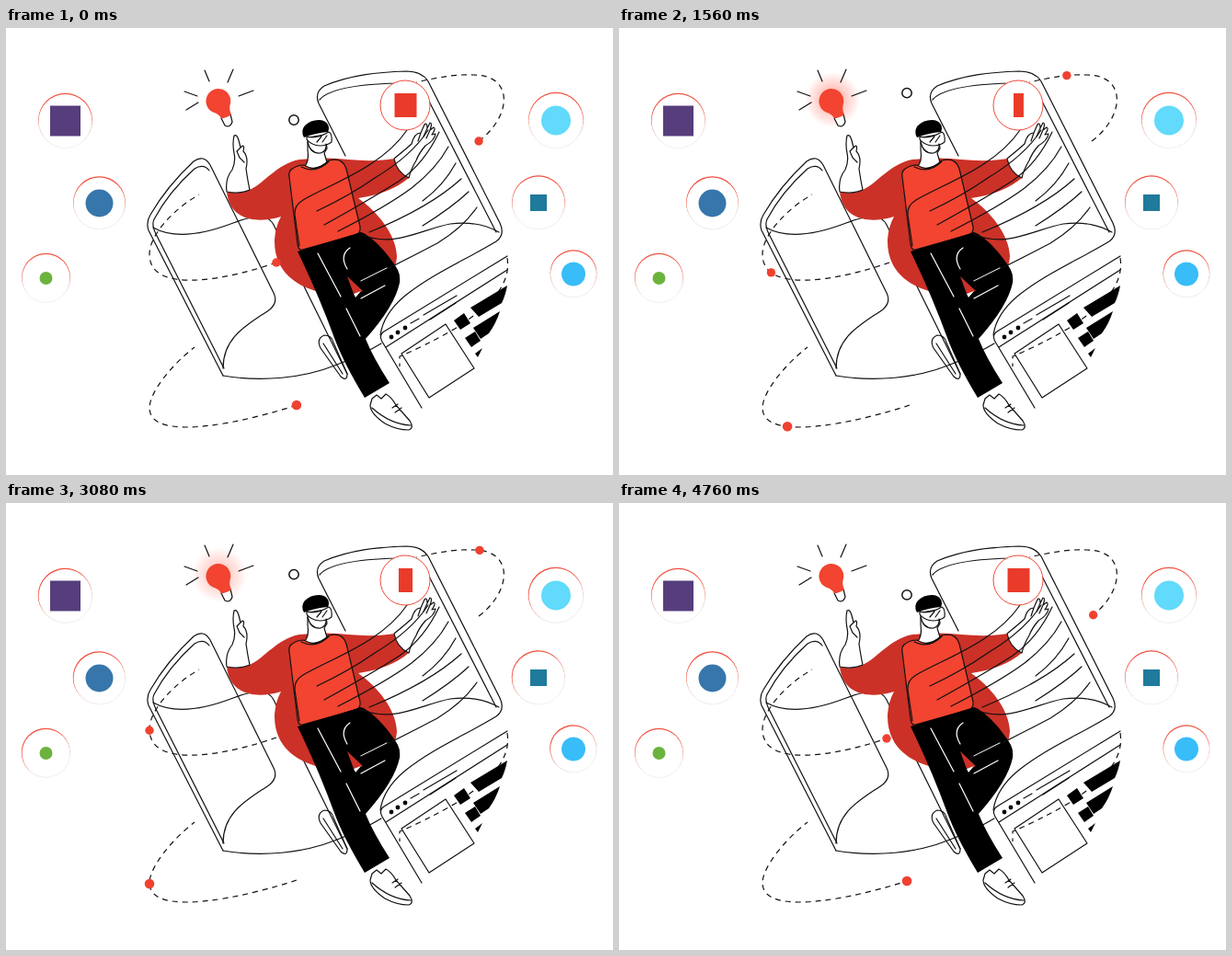
An HTML page that plays this animation: 660x486 px, repeating every 4800 ms.

```html
<!DOCTYPE html>
<html lang="en">
<head>
<meta charset="utf-8">
<title>Floating developer</title>
<style>
  html, body { margin: 0; width: 100%; height: 100%; overflow: hidden; background: #fff; }
  svg { display: block; width: 660px; height: 486px; }
  .line { fill: none; stroke: #111; stroke-width: 1.2; stroke-linecap: round; stroke-linejoin: round; }
  .paper { fill: #fff; }
  .dash { stroke-dasharray: 6 5; stroke-linecap: butt; }
  .light { stroke: #fff; }
  .red { fill: #f24430; }
  .cape { fill: #cb3127; }
</style>
</head>
<body>
<svg viewBox="0 0 660 486">
  <defs>
    <radialGradient id="glow">
      <stop offset=".35" stop-color="#ff5b49" stop-opacity=".5"/>
      <stop offset=".75" stop-color="#ff7b6c" stop-opacity=".25"/>
      <stop offset="1" stop-color="#ff7b6c" stop-opacity="0"/>
    </radialGradient>
  </defs>

  <!-- left sheet -->
  <g class="line">
    <path d="M236 378L155 220Q152 211 157 203Q175 172 204 145Q215 137 222 149L291 288Q296 298 287 306C264 322 236 335 236 370"/>
    <path d="M237 370L163 224Q158 214 161 208Q177 178 205 153Q215 147 221 155"/>
    <path d="M160 217C185 231 221 222 247 212Q265 205 277 205Q287 206 291 214L371 376"/>
    <path d="M236 378C278 385 323 381 360 366Q390 354 408 343"/>
    <path d="M342 348L364 379Q371 385 371 376L356 342Q354 334 346 334Q337 338 342 348M345 343L366 376"/>
  </g>

  <!-- right phone -->
  <g class="line">
    <path d="M369 139L340 82Q335 70 346 63C374 51 404 48 435 47Q452 47 459 58L537 212Q543 225 533 232C500 252 464 267 434 291Q410 311 407 334"/>
    <path d="M341 78C351 66 387 61 425 60Q442 58 449 63L454 68L533 222"/>
  </g>

  <!-- dashed orbits -->
  <g class="line dash">
    <path id="orbitA" d="M514 123C550 96 553 51 508 51C488 50 468 54 446 59"/>
    <path id="orbitB" d="M294 255C240 274 156 290 156 246C156 225 182 197 210 181"/>
    <path id="orbitC" d="M316 410C262 428 156 452 156 413C156 397 178 368 205 347"/>
    <path d="M545 250C550 283 520 306 488 327Q455 346 428 357V368"/>
  </g>

  <!-- browser window -->
  <g class="line">
    <path d="M545 248L411 330Q405 334 409 341L452 413M413 347L545 263"/>
    <path d="M430 354L478 322L509 370L460 402Z"/>
    <path d="M440 321L449 316M461 317L489 299M454 312L490 291"/>
  </g>
  <path d="M487 318L498 310L505 321L494 328ZM505 304L545 280Q543 291 539 299L514 314ZM499 337L510 330L516 340L506 347ZM508 326L537 308Q533 321 525 332L516 338ZM510 354L518 348L513 358Z"/>
  <circle cx="419" cy="336" r="2.4"/><circle cx="426" cy="331" r="2.4"/><circle cx="434" cy="326" r="2.4"/>

  <!-- person -->
  <path class="cape" d="M240 178Q255 181 265 176C282 168 294 148 319 143Q350 140 372 143Q404 146 429 141Q424 151 438 163Q418 180 383 185C404 200 424 224 425 248Q424 270 402 282Q379 291 350 289C315 283 291 264 292 230Q293 216 299 205Q276 212 260 206Q242 199 240 178Z"/>
  <path class="line paper" d="M240 178Q238 164 246 154Q250 145 248 136Q246 126 248 117Q251 115 253 122L255 130Q260 125 258 134Q264 140 261 153Q263 167 265 176Q254 181 240 178M255 130L251 134L254 141L259 146"/>
  <path class="line paper" d="M422 142Q432 134 441 126Q444 114 451 114L455 105Q458 102 458 109L461 103Q464 103 461 111L465 108Q468 109 463 116L467 115Q466 122 456 128Q449 136 446 144Q440 154 438 163Q425 157 422 142M451 114L448 123M458 109L454 118M461 111L457 120"/>
  <path class="line paper" d="M328 132Q330 146 324 151Q337 156 349 146L346 136L349 131L347 116L328 119Z"/>
  <path class="line red" d="M310 154Q316 149 324 149Q337 158 351 144Q366 140 370 153L385 216Q386 223 380 225L322 241Q318 242 317 235L308 162Q307 157 310 154Z"/>
  <path class="line" d="M321 151Q337 159 351 145"/>
  <path class="line paper" d="M327 118Q338 121 351 113Q355 115 354 124Q349 128 341 128Q331 127 327 121ZM328 124Q331 137 342 136Q349 134 348 126M338 124L343 118M344 124L349 117"/>
  <path d="M324 119Q320 112 325 106Q331 100 340 100Q347 100 350 105Q352 109 350 113Q337 114 324 119Z"/>
  <path d="M317 243L386 222C398 226 417 247 426 263Q429 269 428 277Q423 302 391 338Q399 358 417 386L390 402Q367 364 357 337Q339 288 317 243Z"/>
  <path class="cape" d="M371 270L388 286L378 289Z"/>
  <path class="paper" d="M378 289L386 286L380 293Z"/>
  <path class="line light" d="M339 245L364 292M370 305L385 335M371 262Q362 247 374 239M386 275L414 261M386 294L412 280"/>
  <path class="line paper" d="M398 403L403 399L408 403L413 398Q419 401 424 410L439 427Q444 435 438 437Q425 437 412 430Q396 419 396 410ZM398 413Q418 431 440 432M420 413L426 409M423 418L430 413"/>

  <!-- transparent screen in front -->
  <g class="line">
    <path d="M319 237L314 203Q313 193 323 187C354 169 409 151 436 111"/>
    <path d="M338 199Q374 182 401 163Q441 139 459 111"/>
    <path d="M346 214Q395 187 428 166Q455 147 471 113"/>
    <path d="M361 221Q414 194 441 174Q468 153 481 129"/>
    <path d="M453 188Q476 171 489 147"/>
    <path d="M395 222Q461 195 495 164"/>
    <path d="M453 215Q485 195 503 178"/>
    <path d="M386 276Q431 254 469 234Q497 217 512 195"/>
    <path d="M385 224C421 240 451 219 483 213Q513 209 536 222"/>
  </g>

  <!-- bulb -->
  <circle id="halo" cx="232" cy="78" r="30" fill="url(#glow)"/>
  <path class="line" d="M216 46L221 58M247 45L241 59M269 68L253 74M194 69L208 74M209 81L196 89"/>
  <path class="line paper" d="M234 98L244 94L246 102Q244 109 238 106Z"/>
  <path class="red" d="M234 98Q231 93 225 91.5A13.4 13.4 0 1 1 244 82Q242 88 245 94Q240 98 234 98Z"/>

  <circle id="bubble" class="line paper" cx="313" r="5.2" style="stroke-width:1.5"/>
  <circle cx="434" cy="84" r="27" fill="#fff" stroke="#ef4b3a"/>
  <rect id="spinner" x="-12" y="-13" width="24" height="26" fill="#ea3a2a"/>
  <g id="badges"></g>
  <g id="dots"></g>
</svg>
<script>
const LOOP = 4800, TAU = Math.PI * 2;
const byId = id => document.getElementById(id);

function add(parent, tag, attrs) {
  const el = document.createElementNS('http://www.w3.org/2000/svg', tag);
  for (const key in attrs) el.setAttribute(key, attrs[key]);
  return parent.appendChild(el);
}

// x, y, radius, colour, half size, round?
const rims = [
  [64.5, 101, 29, '#563d7c', 16.5, false],
  [101.5, 190.5, 28, '#3776ab', 15, true],
  [43.5, 272, 26, '#6cb33e', 7, true],
  [598, 100.5, 29.5, '#61dafb', 16, true],
  [579, 190, 28.5, '#1f7a9c', 9, false],
  [617, 267.5, 25, '#38bdf8', 13, true]
].map(([x, y, r, fill, half, round]) => {
  const badge = add(byId('badges'), 'g', { transform: `translate(${x} ${y})` });
  add(badge, 'circle', { r: r + .3, fill: 'none', stroke: '#ddd', 'stroke-width': .6 });
  const rim = add(badge, 'circle', { r: r + .3, fill: '#f2503e' });
  add(badge, 'circle', { r, fill: '#fff' });
  if (round) add(badge, 'circle', { r: half, fill });
  else add(badge, 'rect', { x: -half, y: -half, width: 2 * half, height: 2 * half, fill });
  return rim;
});

// Each dot runs out along its orbit and back: [ms, share of the path]
const dots = [
  ['orbitA', 4.7, [[0, 0], [720, .357], [1560, .749], [2040, .98], [2360, .857], [3080, .58], [3720, .35], [LOOP, 0]]],
  ['orbitB', 4.7, [[0, 0], [720, .274], [1560, .545], [2270, 1], [2360, .95], [3080, .635], [3720, .365], [LOOP, 0]]],
  ['orbitC', 5.3, [[0, 0], [720, .256], [1560, .527], [2270, 1], [2360, .926], [3080, .67], [3720, .333], [LOOP, 0]]]
].map(([id, r, keys]) => {
  const path = byId(id);
  return { path, keys, length: path.getTotalLength(), el: add(byId('dots'), 'circle', { r, fill: '#f04130' }) };
});

function valueAt(keys, t) {
  const i = keys.findIndex(key => key[0] > t);
  const [t0, v0] = keys[i - 1], [t1, v1] = keys[i];
  return v0 + (v1 - v0) * (t - t0) / (t1 - t0);
}

function draw(now) {
  const t = now % LOOP;
  const wave = Math.cos(TAU * t / 2400);
  const turn = TAU * t / 1600;

  byId('bubble').setAttribute('cy', 81.5 + 18.5 * wave);
  byId('halo').setAttribute('opacity', (1 - wave) / 2);
  byId('spinner').setAttribute('transform', `translate(434.5 84) scale(${Math.cos(TAU * t / LOOP)} 1)`);
  for (const rim of rims) {
    rim.setAttribute('cx', Math.sin(turn));
    rim.setAttribute('cy', -Math.cos(turn));
  }
  for (const { path, keys, length, el } of dots) {
    const { x, y } = path.getPointAtLength(length * valueAt(keys, t));
    el.setAttribute('cx', x);
    el.setAttribute('cy', y);
  }
}

function tick() {
  draw(performance.now());
  requestAnimationFrame(tick);
}
tick();
</script>
</body>
</html>
```
